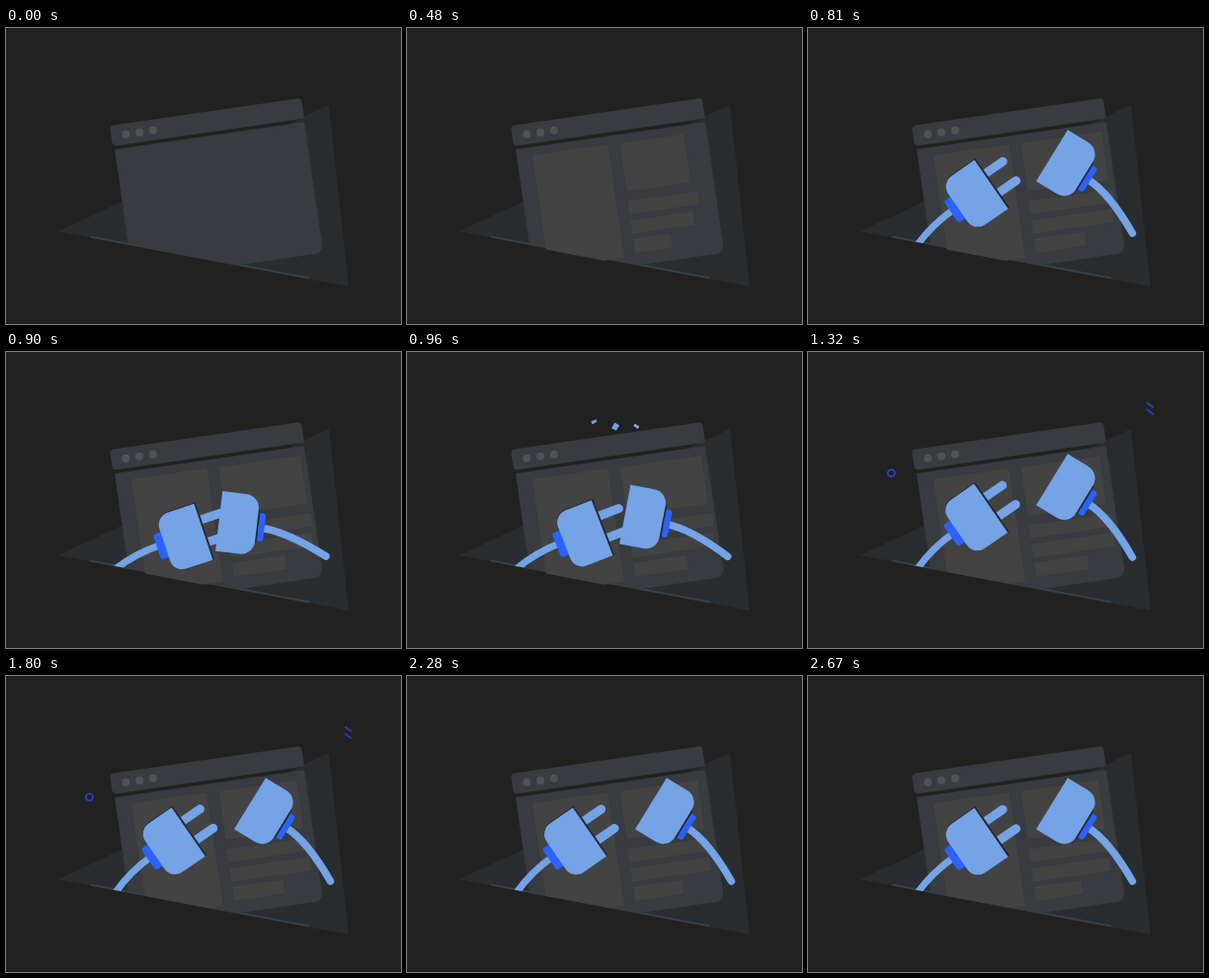
These frames come from a looping animation (400 by 300 pixels, 2.73 s). An HTML page with a canvas:

```html
<!DOCTYPE html>
<html lang="en">
<head>
<meta charset="utf-8">
<title>Unplugged</title>
<style>
html, body { margin: 0; width: 100%; height: 100%; overflow: hidden; background: #212121; }
canvas { display: block; }
</style>
</head>
<body>
<canvas id="stage" width="400" height="300"></canvas>
<script>
const ctx = document.getElementById('stage').getContext('2d');
const LOOP = 2730;
const INK = '#212121', FLOOR = '#292d30', FRAME = '#383b40', PANEL = '#434343';
const SKY = '#74a3e6', BLUE = '#2b62ff', EDGE = '#262a31';
const TILT = -8.25 * Math.PI / 180;

const clamp = x => Math.min(1, Math.max(0, x));
const span = (t, a, b) => clamp((t - a) / (b - a));
const smooth = x => x * x * (3 - 2 * x);
const easeOut = x => 1 - (1 - x) ** 2;
const mix = (a, b, k) => a + (b - a) * k;

function trace(points) {
  ctx.beginPath();
  points.forEach(([x, y]) => ctx.lineTo(x, y));
}

function line(points, color, width) {
  trace(points);
  ctx.strokeStyle = color;
  ctx.lineWidth = width;
  ctx.stroke();
}

function box(x, y, w, h, color, radius = 0) {
  if (w <= 0 || h <= 0) return;
  ctx.fillStyle = color;
  ctx.beginPath();
  ctx.roundRect(x, y, w, h, radius);
  ctx.fill();
}

function placed(x, y, angle, draw) {
  ctx.save();
  ctx.translate(x, y);
  ctx.rotate(angle);
  draw();
  ctx.restore();
}

// Keeps everything above the sloping floor edge.
function aboveFloor(drop, draw) {
  ctx.save();
  trace([[0, 195.9 + drop], [0, 0], [400, 0], [400, 272.1 + drop]]);
  ctx.clip();
  draw();
  ctx.restore();
}

function drawWindow(t) {
  trace([[53, 206], [327, 78], [347, 262]]);
  ctx.fillStyle = FLOOR;
  ctx.fill();
  line([[85, 211.5], [307, 253.5]], '#37404a', 2);

  placed(105, 99, TILT, () => box(0, 0, 196, 21, FRAME, [4, 4, 1, 4]));
  ctx.fillStyle = '#505256';
  for (let i = 0; i < 3; i++) {
    ctx.beginPath();
    ctx.arc(121.3 + i * 13.8, 107.8 - i * 2, 4, 0, 7);
    ctx.fill();
  }
  aboveFloor(0, () => placed(110, 123, TILT, () =>
    box(0, 0, 194, 134, FRAME, [0, 0, 8, 0])));

  const shrink = span(t, 1080, 2700);
  const grow = (full, end) => full * easeOut(span(t, 0, end));
  const drop = 1.8 * (1 - span(t, 1050, 1320));
  aboveFloor(drop, () => placed(110, 123, TILT, () => {
    box(16, 8.5, 77, grow(116, 480), PANEL);
    box(105.5, 9.2, grow(83, 900) - 4 * span(t, 1080, 1400), 49, PANEL);
    box(104.8, 68.6, grow(86, 820) - 4.5 * shrink, 13, PANEL);
    box(104.8, 88, grow(84, 950) - 4.5 * shrink, 13.5, PANEL);
    box(104.8, 107, grow(55, 1080) - 7 * shrink, 14, PANEL);
  }));
}

function cable(x, y, angle, from, bend, endX, endY, width) {
  const c = Math.cos(angle), s = Math.sin(angle);
  ctx.beginPath();
  ctx.moveTo(x + c * from, y + s * from);
  ctx.quadraticCurveTo(x + c * bend, y + s * bend, endX, endY);
  ctx.strokeStyle = SKY;
  ctx.lineWidth = width;
  ctx.lineCap = 'round';
  ctx.stroke();
  ctx.lineCap = 'butt';
}

function drawPlugs(t) {
  const join = t < 915 ? smooth(span(t, 810, 905)) : 1 - smooth(span(t, 930, 1050));
  const recoil = Math.sin(Math.PI * span(t, 1050, 2690));

  const lx = mix(185.6, 200, join) - 0.9 * recoil;
  const ly = mix(158.5, 182.3, join) - 0.5 * recoil;
  const la = mix(-34.7, -18.4, join) * Math.PI / 180;
  aboveFloor(0, () => cable(lx, ly - 1, la, -45, -72, 110.5, 220, 7));
  placed(lx, ly, la, () => {
    for (const y of [-12.4, 11.2]) {
      box(2, y - 4.5, 25.3, 9, SKY, [0, 4.5, 4.5, 0]);
    }
    box(-49.5, -13.3, 9, 26.6, BLUE, [3, 0, 0, 3]);
    box(-41, -31, 42.8, 61, EDGE, [13, 0, 0, 13]);
    box(-41.3, -30, 41.3, 60, SKY, [13, 0, 0, 13]);
  });

  const rx = mix(247, 215.5, join), ry = mix(129.2, 171.6, join);
  const ra = mix(31.6, 6.6, join) * Math.PI / 180;
  cable(rx, ry + 2, ra, 43, 68, mix(328.5, 324, join), mix(208, 207, join), 7.5);
  placed(rx, ry, ra, () => {
    box(40.3, -13, 6.2, 28.5, BLUE, [0, 3, 3, 0]);
    box(20, -16, 20.3, 33, EDGE);
    box(0, -30.5, 38.6, 61, SKY, [0, 14, 14, 0]);
  });
}

function drawSparks(t) {
  const head = smooth(span(t, 940, 1035)), tail = smooth(span(t, 1070, 1180));
  if (head <= tail) return;
  const sparks = [
    [23.5, [[190, 72], [180.3, 50.5]]],
    [51, [[209.5, 78.5], [219, 62], [206, 57.5], [216, 40.5]]],
    [24, [[231.5, 76.5], [244.8, 56.5]]]
  ];
  for (const [length, points] of sparks) {
    ctx.setLineDash([(head - tail) * length, 200]);
    ctx.lineDashOffset = -tail * length;
    line(points, SKY, 5.5);
  }
  ctx.setLineDash([]);
}

function drawTwinkles(t) {
  if (t < 1190 || t > 2670) return;
  ctx.globalAlpha = 0.5 - 0.5 * Math.cos((t - 1190) / 370 * 2 * Math.PI);
  const color = '#2f46da';
  ctx.beginPath();
  ctx.arc(84.5, 122.8, 3.5, 0, 7);
  ctx.strokeStyle = color;
  ctx.lineWidth = 2;
  ctx.stroke();
  for (const y of [51.3, 58.3]) line([[343, y], [350, y + 5]], color, 2);
  ctx.globalAlpha = 1;
}

function render(now) {
  const t = now % LOOP;
  ctx.fillStyle = INK;
  ctx.fillRect(0, 0, 400, 300);
  drawWindow(t);
  if (t >= 810) {
    drawPlugs(t);
    drawSparks(t);
    drawTwinkles(t);
  }
}

const start = performance.now();
function tick() {
  render(performance.now() - start);
  requestAnimationFrame(tick);
}
tick();
</script>
</body>
</html>
```
